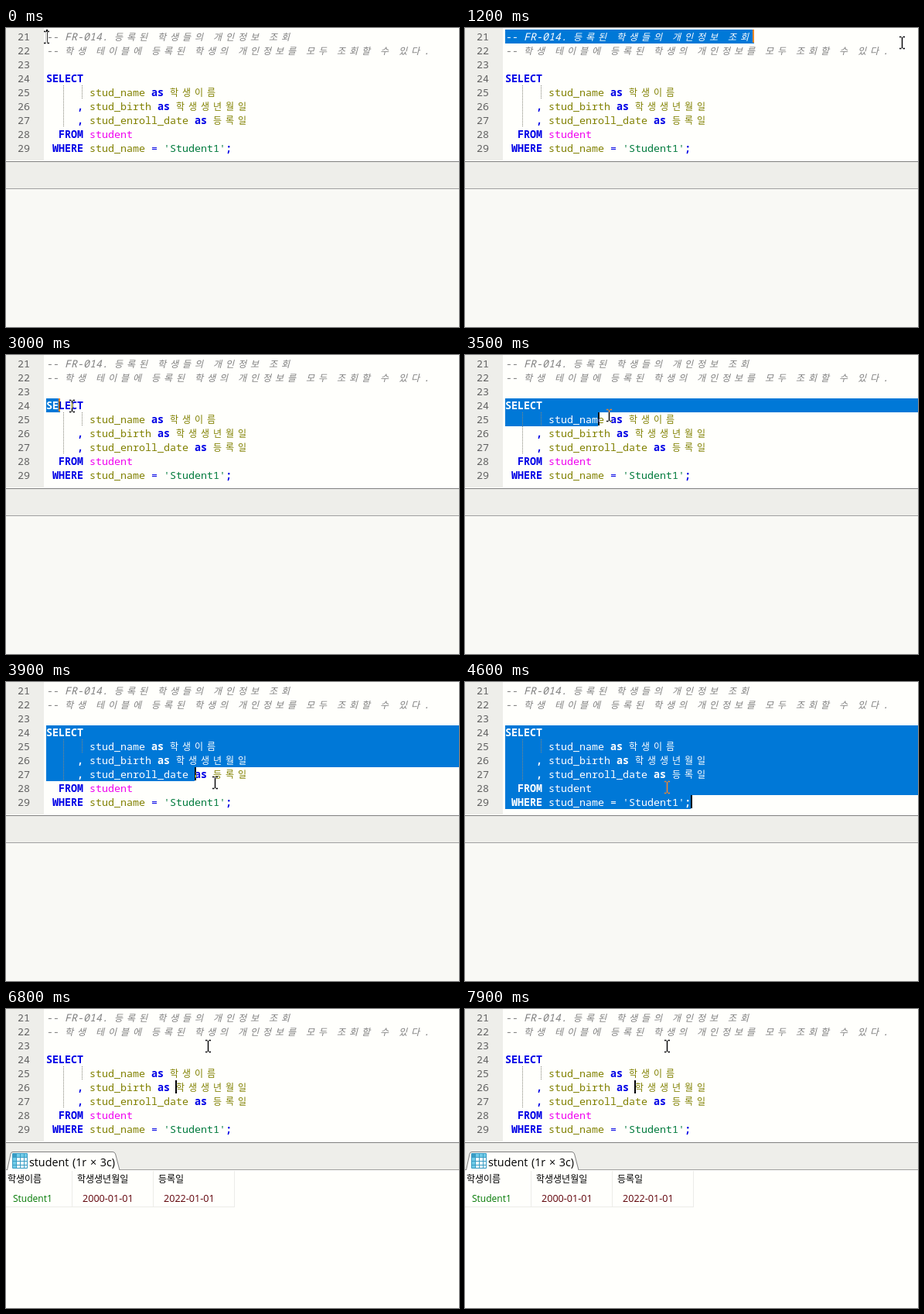
Write an HTML page that moves like this. It is 586 px wide and 386 px high and loops after 8000 ms.

```html
<!DOCTYPE html>
<html lang="ko">
<head>
<meta charset="utf-8">
<title>SQL editor</title>
<style>
  html, body { margin: 0; width: 100%; height: 100%; overflow: hidden; background: #f9f9f5; }
  svg { display: block; }
  .code text { font: 13.33px "Noto Sans Mono", monospace; white-space: pre; }
  .code .hangul { font: 12px "Noto Sans CJK KR", "Noto Sans CJK JP", sans-serif; }
  .num { fill: #626262; }
  .comment { fill: #808080; }
  .code .comment { font-style: italic; }
  .key { fill: #0000e6; }
  .code .key { font-weight: bold; }
  .sym { fill: #0000e6; }
  .id { fill: #808000; }
  .table { fill: #f000f0; }
  .str { fill: #007a3c; }
  #picked text { fill: #fff; }
  .invert { mix-blend-mode: difference; }
  .ui { font-family: "Open Sans", "Noto Sans CJK KR", "Noto Sans CJK JP", sans-serif; font-size: 12px; fill: #000; }
</style>
</head>
<body>
<svg id="stage" width="586" height="386" viewBox="0 0 586 386">
  <clipPath id="clip"></clipPath>
  <rect width="586" height="386" fill="#f9f9f5"/>
  <rect width="586" height="172" fill="#fffffc"/>
  <rect width="49" height="171" fill="#eeeeea"/>
  <g id="plain" class="code"></g>
  <g clip-path="url(#clip)">
    <rect width="586" height="172" fill="#0078d7"/>
    <g id="picked" class="code"></g>
  </g>
  <path d="M74.5 74V128M98.5 74V92" stroke="#88887c" stroke-dasharray="1 1"/>
  <rect id="gap" x="374" y="2" width="5" height="18" fill="#fffffc"/>

  <rect y="172" width="586" height="36" fill="#eeeeea"/>
  <path d="M0 172.5H586" stroke="#808080"/>
  <path d="M0 207.5H586" stroke="#a0a0a0"/>

  <g id="result" class="ui">
    <rect y="208" width="586" height="178" fill="#fffffc"/>
    <path d="M1.5 208L6 187Q6.5 184.5 9 184.5H138Q140.5 184.5 141.5 187L147 208" fill="#fffffc" stroke="#808080"/>
    <rect x="8" y="186" width="20" height="20" rx="1" fill="#3a9cc4"/>
    <path d="M14 192h4v4h-4zm5 0h4v4h-4zm5 0h3v4h-3zM14 197h4v4h-4zm5 0h4v4h-4zm5 0h3v4h-3zM14 202h4v3h-4zm5 0h4v3h-4zm5 0h3v3h-3z" fill="#f4fcfe"/>
    <path d="M9 192h4v4h-4zm0 5h4v4h-4zm0 5h4v3h-4zM14 187h4v4h-4zm5 0h4v4h-4zm5 0h3v4h-3z" fill="#70cbe8"/>
    <text x="30" y="203" font-size="14.3" word-spacing="1">student (1r × 3c)</text>
    <path d="M85.5 209V255M190.5 209V255M295.5 209V255M0 255.5H296" stroke="#ecece8" fill="none"/>
    <text x="2" y="224">학생이름</text>
    <text x="92" y="224">학생생년월일</text>
    <text x="197" y="224">등록일</text>
    <text x="9" y="249" fill="#007800">Student1</text>
    <g fill="#600008" font-size="12.6">
      <text x="99" y="249">2000-01-01</text>
      <text x="204" y="249">2022-01-01</text>
    </g>
  </g>

  <rect id="caret" class="invert" width="2" height="17" fill="#fff"/>
  <path id="mouse" class="invert" d="M-3.5 -7.5H-1M1 -7.5H3.5M0 -7V7M-3.5 7.5H-1M1 7.5H3.5" stroke="#fff" stroke-width="1.4" fill="none"/>
</svg>
<script>
const LOOP = 8000, LEFT = 52, TOP = 2, CELL = 8, ROW = 18, RIGHT = 586;
const $ = id => document.getElementById(id);

// row, column, style, text
const tokens = [
  [0, 0, 'comment', '-- FR-014. 등록된 학생들의 개인정보 조회'],
  [1, 0, 'comment', '-- 학생 테이블에 등록된 학생의 개인정보를 모두 조회할 수 있다.'],
  [3, 0, 'key', 'SELECT'],
  [4, 7, 'id', 'stud_name'], [4, 17, 'key', 'as'], [4, 20, 'id', '학생이름'],
  [5, 5, 'key', ','], [5, 7, 'id', 'stud_birth'], [5, 18, 'key', 'as'], [5, 21, 'id', '학생생년월일'],
  [6, 5, 'key', ','], [6, 7, 'id', 'stud_enroll_date'], [6, 24, 'key', 'as'], [6, 27, 'id', '등록일'],
  [7, 2, 'key', 'FROM'], [7, 7, 'table', 'student'],
  [8, 1, 'key', 'WHERE'], [8, 7, 'id', 'stud_name'], [8, 17, 'sym', '='],
  [8, 19, 'str', "'Student1'"], [8, 29, 'key', ';']
];
const stops = Array.from({ length: 9 }, () => [LEFT]);  // caret positions per row

function addText(parent, row, xs, style, text) {
  const el = document.createElementNS('http://www.w3.org/2000/svg', 'text');
  el.setAttribute('x', xs.join(' '));
  el.setAttribute('y', TOP + row * ROW + 14);
  el.setAttribute('class', style);
  el.textContent = text;
  parent.append(el);
}

for (const [row, col, style, text] of tokens) {
  let x = LEFT + col * CELL;
  for (const run of text.match(/[가-힣]+|[^가-힣]+/g)) {
    const wide = run[0] >= '가';  // Hangul takes two cells
    const step = wide ? 2 * CELL : CELL;
    const xs = [...run].map((_, i) => x + i * step);
    x += run.length * step;
    stops[row].push(...xs, x);
    for (const layer of ['plain', 'picked']) {
      addText($(layer), row, xs, wide ? style + ' hangul' : style, run);
    }
  }
}
for (let row = 0; row < 9; row++) addText($('plain'), row, [15, 23], 'num', String(21 + row));

// time, x, y of the pointer
const path = [
  [0, 52, 12], [700, 374, 12], [950, 570, 14], [1200, 565, 19], [1400, 562, 29], [1800, 552, 30],
  [2200, 119, 92], [2650, 54, 65], [2800, 54, 65], [3100, 100, 67], [3400, 172, 76], [3500, 186, 78],
  [3900, 270, 130], [4200, 310, 162], [4350, 310, 160], [4600, 261, 136], [5100, 226, 102],
  [5300, 226, 102], [5500, 232, 104], [5800, 232, 104], [6600, 261, 48], [LOOP, 261, 48]
];
const drags = [[0, 1700], [2800, 4350], [5300, 5300]];
const LAG = 100, BLINK = 530, RESULT = 6600;
const clamp = (v, lo, hi) => Math.max(lo, Math.min(hi, v));

function pointer(t) {
  const i = path.findIndex(p => p[0] > t);
  const [t0, x0, y0] = path[i - 1], [t1, x1, y1] = path[i];
  const k = (t - t0) / (t1 - t0);
  return [x0 + (x1 - x0) * k, y0 + (y1 - y0) * k];
}

function caretAt(t) {
  const [x, y] = pointer(t);
  const row = clamp(Math.floor((y - TOP) / ROW), 0, 8);
  return [Math.max(LEFT, ...stops[row].filter(s => s <= x)), row];
}

function draw(t) {
  const [mx, my] = pointer(t);
  $('mouse').setAttribute('transform', `translate(${Math.round(mx) + .5} ${Math.round(my)})`);

  const [start, end] = drags.findLast(d => d[0] <= t);
  const [, first] = caretAt(start);
  const [cx, row] = caretAt(clamp(t - LAG, start, end));
  const y = r => TOP + r * ROW;
  let rects = '';
  if (end > start && (row > first || cx > LEFT)) {
    for (let r = first; r <= row; r++) {
      const to = r < row ? RIGHT : row === first ? cx + 2 : cx;
      rects += `<rect x="${LEFT}" y="${y(r)}" width="${to - LEFT}" height="${ROW}"/>`;
    }
  }
  $('clip').innerHTML = rects;
  $('gap').style.display = first === 0 && row > 0 ? '' : 'none';

  const on = t < end || Math.floor((t - end) / BLINK) % 2 === 0;
  $('caret').style.display = on ? '' : 'none';
  $('caret').setAttribute('x', row === 5 ? cx - 1 : cx);
  $('caret').setAttribute('y', y(row));
  $('result').style.display = t >= RESULT ? '' : 'none';
}

const began = performance.now();
function tick() {
  draw((performance.now() - began) % LOOP);
  requestAnimationFrame(tick);
}
tick();
</script>
</body>
</html>
```
